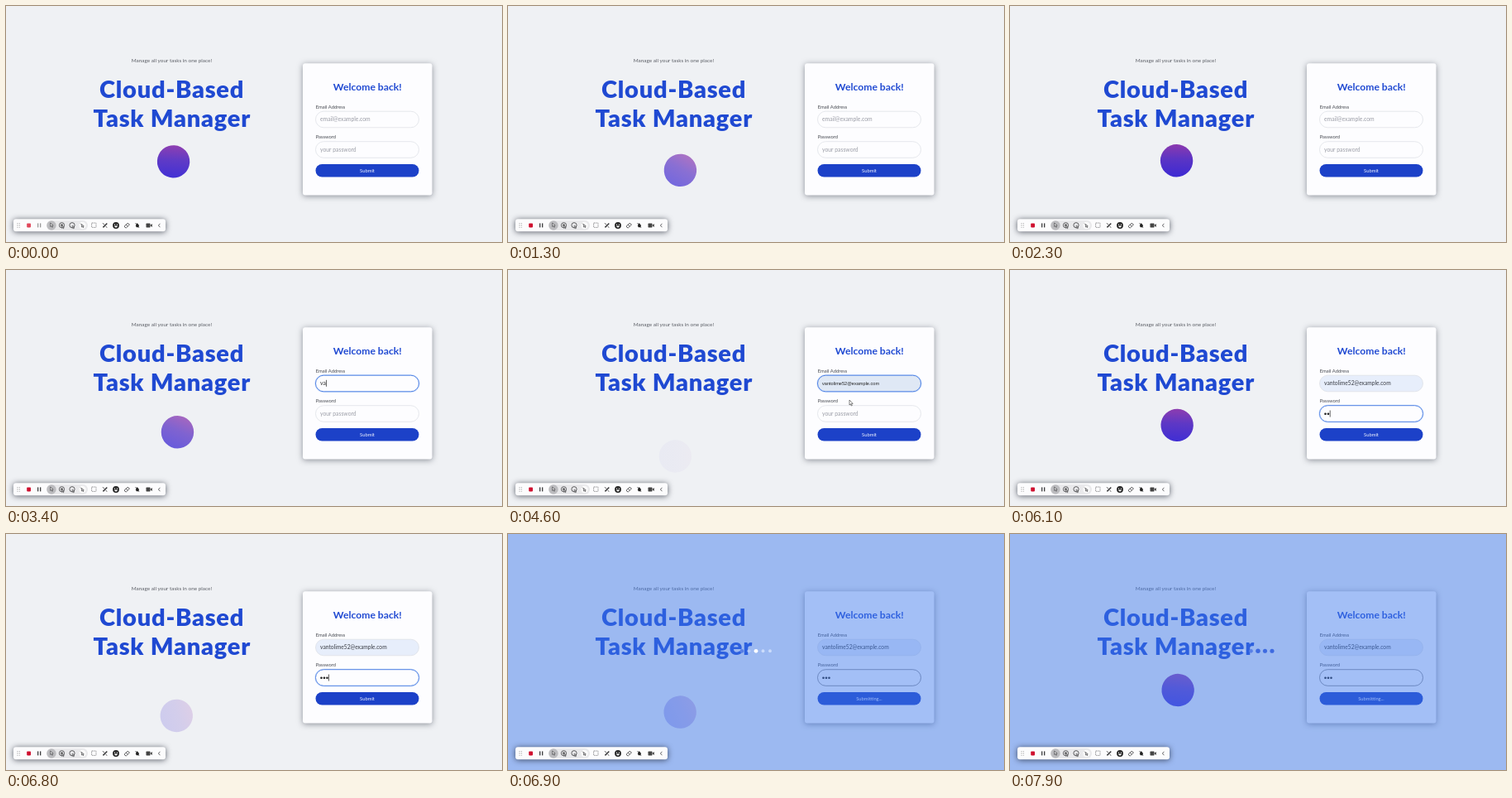
An HTML page with a canvas for the animation above (8000 ms loop, 600x285 px).

```html
<!DOCTYPE html>
<html lang="en">
<head>
<meta charset="utf-8">
<title>Task Manager login</title>
<style>
html, body { margin: 0; width: 100%; height: 100%; overflow: hidden; background: #eff1f4; }
canvas { display: block; width: 600px; height: 285px; }
</style>
</head>
<body>
<canvas id="stage"></canvas>
<script>
const LOOP = 8000;
const BLUE = '#1f49d2';
const EMAIL = 'vantolime52@example.com';
const SANS = 'Lato, "Open Sans", sans-serif';
const T = { focus: 2700, v: 3000, va: 3300, preview: 4400, fill: 4900, password: 5400, dot1: 5800, dot2: 6000, dot3: 6300, load: 6850 };

const canvas = document.getElementById('stage');
const ctx = canvas.getContext('2d');
const ratio = window.devicePixelRatio || 1;
canvas.width = 600 * ratio;
canvas.height = 285 * ratio;

function box(x, y, w, h, r, fill, stroke, line = 0.7) {
  ctx.beginPath();
  ctx.roundRect(x, y, w, h, r);
  if (fill) { ctx.fillStyle = fill; ctx.fill(); }
  if (stroke) { ctx.strokeStyle = stroke; ctx.lineWidth = line; ctx.stroke(); }
}

function disc(x, y, r, fill) {
  ctx.beginPath();
  ctx.arc(x, y, r, 0, 7);
  ctx.fillStyle = fill;
  ctx.fill();
}

function path(points, stroke, line = 0.8, fill) {
  ctx.beginPath();
  points.forEach(([x, y]) => ctx.lineTo(x, y));
  if (fill) { ctx.closePath(); ctx.fillStyle = fill; ctx.fill(); }
  if (stroke) { ctx.strokeStyle = stroke; ctx.lineWidth = line; ctx.stroke(); }
}

function text(str, x, y, size, color, { weight = 400, align = 'left', family = SANS, spacing = 0 } = {}) {
  ctx.font = `${weight} ${size}px ${family}`;
  ctx.letterSpacing = `${spacing}px`;
  ctx.textAlign = align;
  ctx.fillStyle = color;
  ctx.fillText(str, x, y);
  return ctx.measureText(str).width;
}

function withShadow(color, blur, dy, draw) {
  ctx.save();
  ctx.shadowColor = color;
  ctx.shadowBlur = blur * ratio;
  ctx.shadowOffsetY = dy * ratio;
  draw();
  ctx.restore();
}

// The CSS "ease" curve, cubic-bezier(.25, .1, .25, 1)
function ease(x) {
  const bezier = (a, b, s) => 3 * a * s * (1 - s) ** 2 + 3 * b * s * s * (1 - s) + s ** 3;
  let lo = 0, hi = 1;
  for (let i = 0; i < 24; i++) {
    const mid = (lo + hi) / 2;
    if (bezier(0.25, 0.25, mid) < x) lo = mid; else hi = mid;
  }
  return bezier(0.1, 1, lo);
}

// Swings in around its lower left corner while fading in
function drawBall(t) {
  const r = 19.7;
  const p = ease(((t + 1500) % 2000) / 2000);
  ctx.save();
  ctx.globalAlpha = p;
  ctx.translate(181.7, 206.3);
  ctx.rotate((1 - p) * Math.PI / 2);
  const g = ctx.createLinearGradient(0, -2 * r, 0, 0);
  g.addColorStop(0, '#8b38ae');
  g.addColorStop(0.45, '#5a33c4');
  g.addColorStop(1, '#3b29d3');
  disc(r, -r, r, g);
  ctx.restore();
}

function caret(x, y) {
  ctx.fillStyle = '#222';
  ctx.fillRect(x, y, 0.7, 8);
}

function field(y, fill, focused, dark) {
  if (focused) box(374.5, y, 125, 19.6, 9.8, null, 'rgba(90,145,245,.3)', 2);
  box(374.5, y, 125, 19.6, 9.8, fill, focused ? '#4f82e4' : dark ? '#66686f' : '#dcdee4', focused ? 1 : 0.7);
}

function drawEmail(t) {
  const preview = t >= T.preview && t < T.fill;
  const filled = t >= T.fill;
  const focused = t >= T.focus && t < T.password;
  field(127.2, filled ? '#e7eefb' : preview ? '#dfe8f5' : '#fdfdff', focused);
  if (filled) return text(EMAIL, 380, 139.2, 6.7, '#3a3d45');
  if (preview) return text(EMAIL, 380, 139, 5.6, '#222', { family: '"Liberation Sans", Arial, sans-serif' });
  if (t < T.v) {
    text('email@example.com', 380, 139.2, 6.8, '#9b9da6');
    if (focused) caret(380, 132.8);
    return;
  }
  const w = text(t < T.va ? 'v' : 'va', 380, 139.2, 6.8, '#333');
  caret(380.3 + w, 132.8);
}

function drawPassword(t) {
  const loading = t >= T.load;
  const focused = t >= T.password && !loading;
  field(163.7, '#fdfdff', focused, loading);
  const count = [T.dot1, T.dot2, T.dot3].filter(k => t >= k).length;
  if (!count) text('your password', 380, 175.6, 6.8, '#9b9da6');
  for (let i = 0; i < count; i++) disc(381.5 + i * 3.5, 173.8, 1.3, '#222');
  if (focused) caret(380 + count * 3.4, 169.5);
}

function drawPage(t) {
  ctx.fillStyle = '#eff1f4';
  ctx.fillRect(0, 0, 600, 285);
  text('Manage all your tasks in one place!', 200.4, 67.8, 6.4, '#5c5f66', { align: 'center' });
  const title = { weight: 900, align: 'center', spacing: 0.75 };
  text('Cloud-Based', 200.6, 111.3, 29, BLUE, title);
  text('Task Manager', 200.8, 145.6, 29, BLUE, title);
  drawBall(t);

  withShadow('rgba(40,45,60,.5)', 7, 1.2, () => box(359, 69.3, 156.5, 159.2, 3, '#fdfdff'));
  text('Welcome back!', 437.3, 102.3, 12.2, BLUE, { weight: 700, align: 'center' });
  text('Email Address', 374.7, 123.6, 5.8, '#45484f');
  drawEmail(t);
  text('Password', 374.7, 160.1, 5.8, '#45484f');
  drawPassword(t);
  box(374.5, 191, 125, 15.5, 7.75, '#1c41c8');
  text(t < T.load ? 'Submit' : 'Submitting...', 437, 200.7, 5.8, '#f2f5ff', { align: 'center' });
}

function drawPointer(t) {
  if (t < 4200 || t >= T.dot1) return;
  const s = ease(Math.min(1, Math.max(0, (t - 5000) / 350)));
  ctx.save();
  ctx.translate(413 - 6 * s, 157 + 15 * s);
  path([[0, 0], [0, 6], [1.4, 4.8], [2.4, 7], [3.3, 6.6], [2.4, 4.5], [4.2, 4.4], [0, 0]], '#333', 0.6, '#fff');
  ctx.restore();
}

function mix(a, b, f) {
  return `rgb(${a.map((v, i) => Math.round(v + (b[i] - v) * f)).join()})`;
}

function drawLoader(t) {
  if (t < T.load) return;
  ctx.fillStyle = 'rgba(62,122,236,.47)';
  ctx.fillRect(0, 0, 600, 285);
  [0.3, 0.1, -0.1, 0, 0].forEach((lead, i) => {
    const age = (t - T.load) / 1000 + lead;
    const k = (1 - Math.cos(2 * Math.PI * age / 1.5)) / 2;
    const waiting = age < 0;
    const scale = waiting ? 1 : 0.8 + 0.4 * k;
    const tone = waiting ? '#ffffff' : mix([206, 222, 252], [62, 106, 224], Math.min(1, k * 1.8));
    disc(283 + i * 8.5, 141.3, 2.4 * scale, tone);
  });
}

function arrow(x, y, s, color) {
  path([[x, y], [x, y + 5 * s], [x + 1.4 * s, y + 3.8 * s], [x + 2.4 * s, y + 6 * s], [x + 3.2 * s, y + 5.6 * s], [x + 2.3 * s, y + 3.5 * s], [x + 4 * s, y + 3.3 * s], [x, y]], color, 0.6, '#ddd');
}

function drawToolbar(t) {
  const ink = '#3c3c3e', y = 265;
  withShadow('rgba(20,25,40,.7)', 7, 0.6, () => box(9, 257.3, 184, 15, 3, '#fcfcfd'));
  for (let i = 0; i < 6; i++) disc(14 + (i % 2) * 2.3, 262.6 + (i >> 1) * 2.3, 0.55, '#999');
  box(25.2, 262.6, 4.8, 4.8, 0.8, t < 300 ? '#e0485c' : '#cf1130');
  ctx.fillStyle = t < 300 ? '#999' : ink;
  ctx.fillRect(38, 262.4, 1.3, 5);
  ctx.fillRect(41, 262.4, 1.3, 5);

  box(49, 259, 50, 12, 6, '#e9e9eb');
  disc(55, y, 5.7, '#bcbcbf');
  arrow(53.6, 262, 0.9, ink);
  for (const x of [67.5, 80]) {
    ctx.beginPath();
    ctx.arc(x, y - 0.3, 3.1, 0, 7);
    ctx.strokeStyle = ink;
    ctx.lineWidth = 0.8;
    ctx.stroke();
    if (x < 70) disc(x, y - 0.3, 1.6, '#777');
    arrow(x + 0.2, y, 0.65, ink);
  }
  disc(92.5, y, 4.3, '#fafafa');
  path([[90, 262.7], [91, 263.7]], ink);
  arrow(91.5, 263.5, 0.7, ink);

  ctx.setLineDash([1.2, 1]);
  box(103.6, 262, 5.4, 5.4, 0.5, null, ink, 0.65);
  ctx.setLineDash([]);
  path([[117.4, 267.4], [122.3, 262.5]], ink, 1.5);
  path([[117, 262.2], [119, 264.2]], ink, 0.9);
  path([[120.7, 266.4], [122.3, 267.4]], ink, 0.9);

  disc(133, y, 3.9, '#222');
  disc(131.6, 264, 0.65, '#fff');
  disc(134.4, 264, 0.65, '#fff');
  ctx.beginPath();
  ctx.arc(133, 265.5, 1.9, 0, Math.PI);
  ctx.fillStyle = '#fff';
  ctx.fill();

  path([[143.2, 266], [147, 262.2], [149.5, 264], [145.5, 267.8], [144, 267.5], [143.2, 266]], ink, 0.8);
  path([[145, 264.2], [147.5, 266]], ink, 0.7);
  path([[156.5, 262], [161, 267.8]], ink, 0.8);
  path([[158.8, 262], [161, 265], [160.3, 267.3], [157.8, 267.3], [156.8, 265.2]], null, 0, '#222');
  box(169.5, 262.6, 5, 4.8, 0.6, '#444');
  path([[174.8, 264.5], [176.8, 263], [176.8, 267], [174.8, 265.5]], null, 0, '#444');
  path([[186.4, 262.8], [184.4, 265], [186.4, 267.2]], ink, 0.8);
}

function frame(now) {
  const t = now % LOOP;
  ctx.setTransform(ratio, 0, 0, ratio, 0, 0);
  ctx.lineJoin = 'round';
  drawPage(t);
  drawPointer(t);
  drawLoader(t);
  drawToolbar(t);
  requestAnimationFrame(frame);
}
requestAnimationFrame(frame);
</script>
</body>
</html>
```
